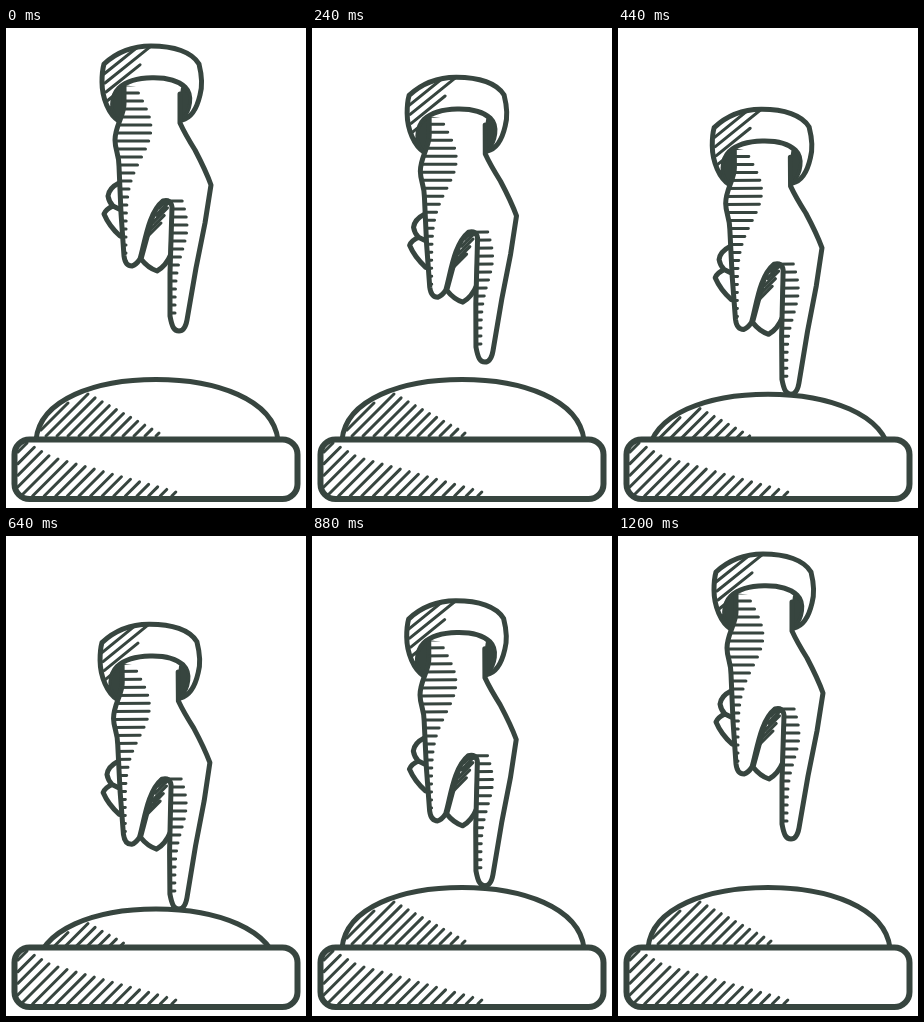
An HTML page that plays this animation: 300 px wide and 480 px high, repeating every 1.24 s.

```html
<!DOCTYPE html>
<html lang="en">
<head>
<meta charset="utf-8">
<title>Hand pressing a button</title>
<style>
  html, body { margin: 0; width: 100%; height: 100%; overflow: hidden; background: #fff; }
  svg { display: block; width: 100%; height: 100%; }
  path, rect { fill: #fff; stroke: #37453f; stroke-width: 5; stroke-linecap: round; stroke-linejoin: round; }
  rect { stroke-width: 6; }
  .hatch { fill: none; stroke-width: 3; }
  .dark { fill: #37453f; stroke-width: 2; }
</style>
</head>
<body>
<svg viewBox="0 0 300 480">
  <defs>
    <clipPath id="inPalm"><use href="#palm"/></clipPath>
    <clipPath id="inCuff"><use href="#cuff"/></clipPath>
  </defs>
  <g id="dome">
    <path d="M30 412C34 371 90 351.5 150 351.5S267 371 272 412Z"/>
    <path class="hatch" id="domeHatch"/>
  </g>
  <rect x="8.5" y="411.5" width="283" height="59.5" rx="15"/>
  <path class="hatch" id="baseHatch"/>
  <g id="hand">
    <path d="M113 155Q103 160 102 168Q103 174 107 178L113 181L107 178Q100 181 98 186Q103 198 114 208"/>
    <path d="M135 231Q142 240 151 243Q160 238 165 226L167 174L150 176Z"/>
    <path class="hatch" id="curlHatch"/>
    <path id="cuff" d="M98 36C112 23 127 18 145 18C168 18 186 24 193 36C196 48 196 60 194 67C191 80 185 90 176 92L113 93C103 87 96 70 96 54Q96 43 98 36Z"/>
    <path class="hatch" id="cuffHatch" clip-path="url(#inCuff)"/>
    <path d="M113 93C104 84 105 68 113 60C127 47 165 46 179 59C187 67 184 82 176 91Z"/>
    <path class="dark" d="M118 57Q106 66 106 77Q108 87 113 93Q118 84 118 75Z"/>
    <path class="dark" d="M176 60Q184 64 184 70Q183 83 176 91L173 80Z"/>
    <path id="palm" d="M118 57L118 76C118 88 109 98 109 112C109 122 113 126 113 138L115 185L118 228C119 236 122 238 126 238Q130 237 134 231C139 215 142 185 157 173Q165 171 166 179L164 245V288C166 299 168 303 173 303Q179 303 181 292L190 240L199 195L205 157Q200 143 189 122Q179 106 174 95V66"/>
    <path class="hatch" id="palmHatch" clip-path="url(#inPalm)"/>
  </g>
</svg>
<script>
const $ = id => document.getElementById(id);
const STEP = 40, LOOP = 1240, HALF = 600, TRAVEL = 70.4, CONTACT = 48.5;

const build = (count, stroke) => Array.from({ length: count }, (_, i) => stroke(i)).join('');

// Parallel slanted strokes whose width runs evenly from first to last
const slants = (count, x, y, dx, dy, first, last, slope = -1) => build(count, i => {
  const w = first + (last - first) * i / (count - 1);
  return `M${x + i * dx} ${y + i * dy}l${w} ${w * slope}`;
});

// Level strokes that reach furthest right around the height `peak`
const rows = (count, x, y, edge, reach, peak, spread) => build(count, i => {
  const rowY = y + i * 8;
  return `M${x} ${rowY}H${edge + reach * Math.exp(-(((rowY - peak) / spread) ** 2))}`;
});

const hatches = {
  dome: slants(11, 40, 408, 11, 0, 42, 3) + 'M35 402L62 375',
  base: slants(14, 15, 468, 11.6, 0, 37, 4) + slants(4, 12, 424, 0, 11.6, 9, 31),
  curl: slants(5, 141, 209, 3, -7.3, 14, 15),
  cuff: slants(5, 98, 46, 1, 9, 58, 10, -0.8),
  palm: rows(23, 104, 57, 120, 25, 100, 42) + rows(15, 156, 173, 169, 12, 198, 35),
};
for (const [name, d] of Object.entries(hatches)) $(name + 'Hatch').setAttribute('d', d);

// Cubic bezier (0.333, 0, 0.49, 1), solved by bisection
function ease(p) {
  let lo = 0, hi = 1;
  for (let i = 0; i < 24; i++) {
    const s = (lo + hi) / 2, r = 1 - s;
    const x = 3 * r * r * s * 0.333 + 3 * r * s * s * 0.49 + s ** 3;
    if (x < p) lo = s; else hi = s;
  }
  return lo * lo * (3 - 2 * lo);
}

function draw() {
  const t = Math.floor(performance.now() % LOOP / STEP) * STEP;
  const e = ease(1 - Math.abs(t - HALF) / HALF);
  const drop = TRAVEL * e;
  $('hand').setAttribute('transform', `translate(0 ${drop}) rotate(${-0.45 * e} 172 300)`);
  $('dome').setAttribute('transform', `translate(0 ${Math.max(0, drop - CONTACT)})`);
  requestAnimationFrame(draw);
}
draw();
</script>
</body>
</html>
```
